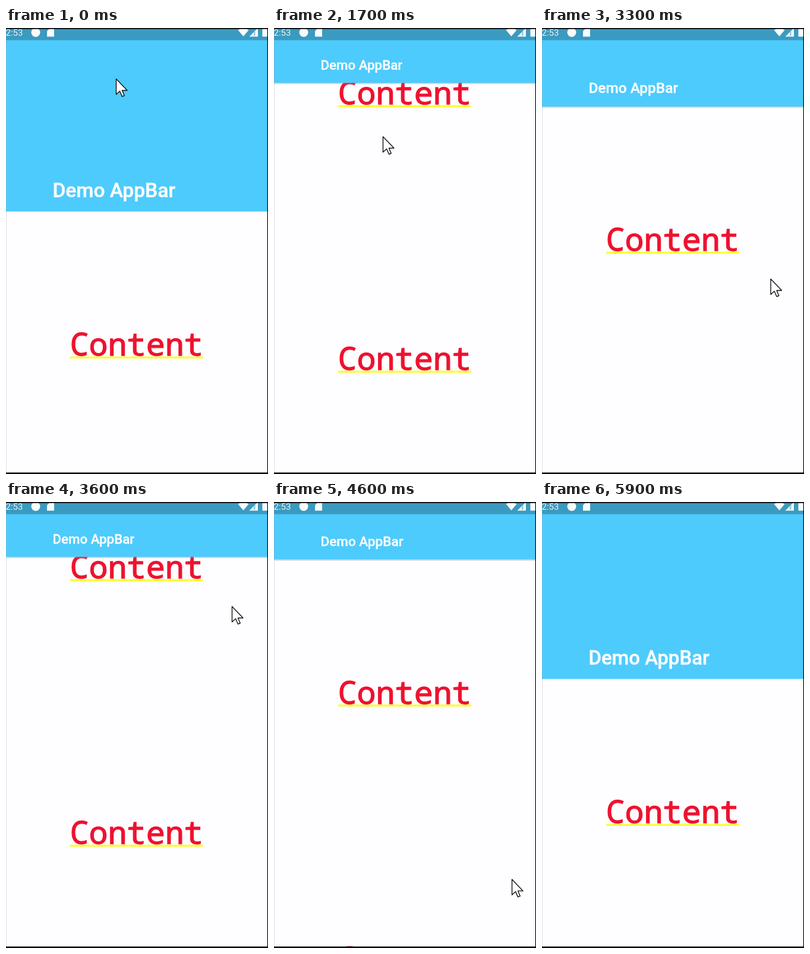
These frames come from a looping animation (441 px wide and 749 px high, 6 s). An HTML page:

```html
<!DOCTYPE html>
<html lang="en">
<head>
<meta charset="utf-8">
<title>Collapsing app bar</title>
<style>
  html, body { margin: 0; width: 100%; height: 100%; overflow: hidden; background: #fefdff; }
  svg { display: block; width: 441px; height: 749px; }
  .title { font: 500 33.5px Roboto, sans-serif; fill: #fcfdfe; stroke: #fcfdfe; stroke-width: .5; }
  .clock { font: 400 15px Roboto, sans-serif; fill: #e9f4f8; }
  .content { font: 500 53.4px "Noto Sans Mono", monospace; fill: #ee1230; stroke: #ee1230; stroke-width: 1.3; }
  .underline { fill: #fdfd3c; }
  .icons { fill: #f8fcfd; }
</style>
</head>
<body>
<svg viewBox="0 0 441 749">
  <defs>
    <g id="item">
      <rect class="underline" x="108" y="551.5" width="224" height="3.5"/>
      <text class="content" x="107.5" y="550">Content</text>
    </g>
    <linearGradient id="shade" x2="0" y2="1">
      <stop stop-color="#8499a3" stop-opacity=".6"/>
      <stop offset="1" stop-color="#8499a3" stop-opacity="0"/>
    </linearGradient>
  </defs>

  <rect width="441" height="749" fill="#fefdff"/>
  <g id="list">
    <use href="#item"/>
    <use href="#item" y="446"/>
  </g>

  <rect id="shadow" width="441" height="3" fill="url(#shade)"/>
  <rect id="bar" width="441" fill="#4dcbfd"/>
  <text id="title" class="title">Demo AppBar</text>

  <rect width="441" height="20.5" fill="#3b9ac0"/>
  <text class="clock" x="-0.5" y="13">2:53</text>
  <g class="icons">
    <circle cx="50" cy="7.5" r="7.5"/>
    <path d="M73 1h8v13.5H69V5.5Z"/>
    <path d="M390.5 3.5Q399.5 -3 408.5 3.5L399.5 14Z"/>
    <path d="M424 0V14.5H409.5Z"/>
    <path d="M431.5 1.5h3V0h4v1.5h2v13h-9Z"/>
  </g>
  <path d="M417 7.5L419.5 5V13H417Z" fill="#3b9ac0" opacity=".55"/>

  <rect width="1" height="749" fill="#8a97a5" opacity=".3"/>
  <path d="M0 0H441V1.8H0ZM0 746.5H441V749H0ZM439.8 0H441V749H439.8Z" fill="#080808"/>
  <path id="cursor" d="M0 0V26L6 20.5L10 29.5L13.7 28L10 19.3H18.5Z"
        fill="#fff" stroke="#111" stroke-width="1.4" stroke-linejoin="round"/>
</svg>
<script>
  const LOOP = 6000, STEP = 100;
  const COLLAPSE = 216;     // scroll distance that folds the bar
  const DRAG = 422;         // length of one full swipe
  const CURSOR_EXIT = 5400;

  const $ = id => document.getElementById(id);
  const mix = (a, b, k) => a + (b - a) * k;

  // Smooth 0 to 1 between two times
  function ease(t, from, to) {
    const k = Math.min(1, Math.max(0, (t - from) / (to - from)));
    return k * k * (3 - 2 * k);
  }

  // Two swipes up and back, then a third that stays up
  const swipes = t => DRAG * (
    ease(t, 300, 550) - ease(t, 650, 1000) +
    ease(t, 1300, 1600) - ease(t, 1700, 1950) +
    ease(t, 3100, 3550));

  // The last pull down trails the pointer, then settles
  const scrollAt = t => swipes(t)
    - 7 * ease(t, 3600, 3800) - 407 * ease(t, 4500, 4700) + 3 * ease(t, 4800, 4900);

  const pointerAt = t => ({
    x: 185 - 2 * ease(t, 0, 300) + 204 * ease(t, 1700, 2000)
      - 7 * ease(t, 3100, 3600) + 22 * ease(t, 3700, 4800),
    y: 85 + 519 * ease(t, 0, 300) - 7 * ease(t, 1700, 2000) - swipes(t)
      + 65 * ease(t, 3700, 4100) + 409 * ease(t, 4300, 4640)
  });

  function draw(t) {
    const { x, y } = pointerAt(t);
    const offset = scrollAt(t);
    const fold = Math.min(1, offset / COLLAPSE);
    const edge = mix(308, 92, fold);

    $('list').setAttribute('transform', `translate(0 ${-offset})`);
    $('bar').setAttribute('height', edge);
    $('shadow').setAttribute('y', edge);
    $('shadow').setAttribute('opacity', mix(0.3, 1, fold));
    $('title').setAttribute('transform',
      `translate(78.4 ${mix(283.7, 69.8, fold)}) scale(${mix(1, 0.667, fold)})`);
    $('cursor').setAttribute('transform', `translate(${x + 0.5} ${y + 0.5})`);
    $('cursor').setAttribute('visibility', t < CURSOR_EXIT ? 'visible' : 'hidden');
  }

  const start = performance.now();
  function tick() {
    const t = (performance.now() - start) % LOOP;
    draw(Math.floor(t / STEP) * STEP);
    requestAnimationFrame(tick);
  }
  tick();
</script>
</body>
</html>
```
